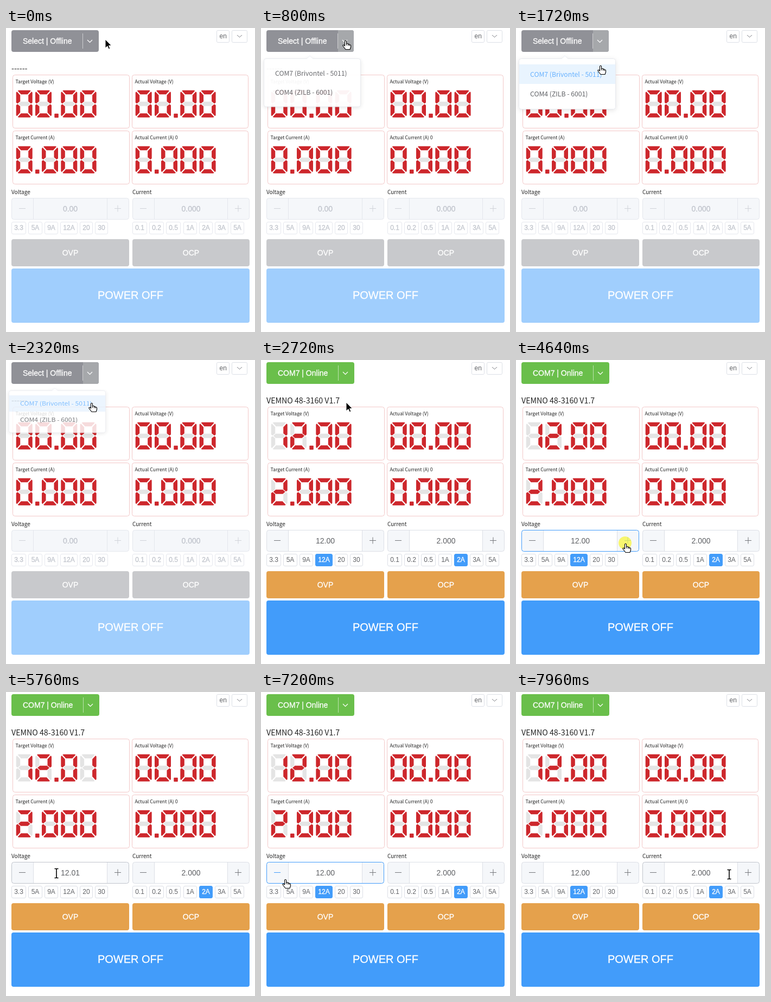
Recreate the animation shown at these times as an HTML page. Size 459x560 px, loop 8000 ms.

```html
<!DOCTYPE html>
<html lang="en">
<head>
<meta charset="utf-8">
<title>Power supply panel</title>
<style>
  html, body { margin: 0; width: 100%; height: 100%; overflow: hidden; background: #fff; }
  svg { display: block; width: 459px; height: 560px; }
  text { font: 14px "Liberation Sans", Arial, sans-serif; white-space: pre; }
  .label { font-family: "Noto Sans CJK SC", "Noto Sans CJK JP", "Noto Sans CJK", "Noto Sans", sans-serif; }
  .menu { filter: drop-shadow(0 2px 4px rgba(0, 0, 0, .1)); }
</style>
</head>
<body>
<svg id="stage" viewBox="0 0 459 560"></svg>
<script>
const stage = document.getElementById('stage');
const LOOP = 8000, STEP = 40;
const CONNECT = 2520, PLUS = 4600, MINUS = 6600;
const CLICKS = [440, 2120, PLUS, MINUS];
const BLUE = '#429cfa', DARK = '#606266', PALE = '#c0c4cc', LINE = '#dcdfe6';

// Pointer path: time, x, y
const PATH = [
  [0, 183, 21], [40, 183, 21], [160, 163, 23], [240, 155, 22],
  [1120, 155, 22], [1320, 154, 27], [1720, 155, 68], [1960, 157, 78],
  [3240, 157, 78], [3400, 158, 98], [3640, 162, 178], [3880, 161, 262], [4040, 160, 279],
  [4080, 160, 279], [4200, 168, 292], [4440, 196, 332], [4560, 201, 337],
  [5320, 201, 337], [5440, 184, 336], [5760, 93, 334], [6000, 44, 337], [6120, 35, 338],
  [6160, 35, 338], [6360, 36, 340],
  [7160, 36, 340], [7280, 60, 352], [7440, 140, 374], [7600, 240, 376],
  [7760, 335, 362], [7880, 380, 342], [7960, 393, 336], [LOOP, 393, 336]
];

const clamp = v => Math.max(0, Math.min(1, v));
const ramp = (t, start, length) => clamp((t - start) / length);
const inside = (p, x0, y0, x1, y1) => p.x >= x0 && p.x < x1 && p.y >= y0 && p.y < y1;
const mix = (a, b, k) => `color-mix(in srgb, ${b} ${k * 100}%, ${a})`;

function pointerAt(t) {
  const i = Math.max(1, PATH.findIndex(k => k[0] > t));
  const [t0, x0, y0] = PATH[i - 1], [t1, x1, y1] = PATH[i];
  const k = (t - t0) / (t1 - t0);
  return { x: x0 + (x1 - x0) * k, y: y0 + (y1 - y0) * k };
}

const rect = (x, y, w, h, fill, stroke = 'none', rx = 4) =>
  `<rect x="${x}" y="${y}" width="${w}" height="${h}" rx="${rx}" fill="${fill}" stroke="${stroke}"/>`;
const line = (d, color, width = 1, extra = '') =>
  `<path d="${d}" fill="none" stroke="${color}" stroke-width="${width}" ${extra}/>`;
const text = (s, x, y, size, fill, extra = '') =>
  `<text x="${x}" y="${y}" style="font-size:${size}px" fill="${fill}" ${extra}>${s}</text>`;
const label = (s, x, y, size, fill = '#222') => text(s, x, y, size, fill, 'class="label"');
const centered = (s, x, y, size, fill, heavy) =>
  text(s, x, y, size, fill, 'text-anchor="middle"' + (heavy ? ` stroke="${fill}" stroke-width=".3"` : ''));

// Seven segments in a 30 x 50 cell, order a b c d e f g
const BAR = [[3, 1], [4.5, 0], [25.5, 0], [27, 1], [21, 7.5], [9, 7.5]];
const SIDE = [[1.5, 2.5], [7.5, 9], [7.5, 20.5], [2.5, 24.5], [0, 22.5], [0, 4]];
const MID = [[4, 25], [8.5, 21], [21.5, 21], [26, 25], [21.5, 29], [8.5, 29]];
const flip = (pts, fx, fy) => pts.map(([x, y]) => [fx ? 30 - x : x, fy ? 50 - y : y]);
const SEGMENTS = [BAR, flip(SIDE, 1, 0), flip(SIDE, 1, 1), flip(BAR, 0, 1), flip(SIDE, 0, 1), SIDE, MID];
const LIT = { 0: 'abcdef', 1: 'bc', 2: 'abged' };

function display(value, x, y) {
  let out = '';
  for (const ch of value) {
    if (ch === '.') {
      out += rect(x, y + 43, 7.5, 7.5, '#cd272c', 'none', 1);
      x += 12;
      continue;
    }
    const draw = on => SEGMENTS.map((pts, i) => LIT[ch].includes('abcdefg'[i]) === on
      ? `<polygon points="${pts.join(' ')}" fill="${on ? '#cd272c' : '#e4e4e4'}"/>` : '').join('');
    out += `<g transform="translate(${x} ${y})">${draw(false)}${draw(true)}</g>`;
    x += 35.3;
  }
  return out;
}

function card(title, value, x, y) {
  return rect(x + .5, y + .5, x < 100 ? 215 : 214, 98, '#fff', '#f3c8c8')
    + label(title, x + 5.5, y + 16, 8.8) + display(value, x + 6.7, y + 28.7);
}

function numberInput(x, w, value, p, online) {
  const left = x + 40.5, right = x + w - 40.5;
  const over = online && inside(p, x, 313, x + w, 353);
  const onMinus = over && p.x < left, onPlus = over && p.x > right;
  const border = onMinus || onPlus ? BLUE : over ? PALE : online ? LINE : '#e4e7ed';
  const icon = on => on ? BLUE : online ? '#74767b' : '#d0d3d9';
  const cx = right + 19.5;
  return rect(x + .5, 313.5, w - 1, 39, '#f5f7fa', border)
    + (online ? rect(left, 314, right - left, 38, '#fff', 'none', 0) : '')
    + line(`M${left} 314V352M${right} 314V352`, online ? LINE : '#e4e7ed')
    + line(`M${x + 14} 332.5h12`, icon(onMinus))
    + line(`M${cx - 6} 332.5h12M${cx} 326.5v12`, icon(onPlus))
    + centered(value, x + w / 2, 338, 14, online ? DARK : PALE, !online);
}

const VOLT_TAGS = [['3.3', 10, 27], ['5A', 41, 26], ['9A', 71, 25], ['12A', 100, 32], ['20', 136, 24], ['30', 164, 24]];
const AMP_TAGS = [['0.1', 233, 27], ['0.2', 264, 27], ['0.5', 295, 27], ['1A', 327, 25],
  ['2A', 356, 25], ['3A', 385, 25], ['5A', 414, 25]];

const tags = (list, active, online) => list.map(([name, x, w]) => {
  const on = name === active;
  return rect(x + .5, 357.5, w - 1, 22, on ? BLUE : '#fff', on ? BLUE : online ? LINE : '#e6e8ee', 2.5)
    + centered(name, x + w / 2, 372, 12, on ? '#fff' : online ? DARK : PALE, on || !online);
}).join('');

function header(t, p, online) {
  const lit = inside(p, 142, 4, 172, 44) || (t > 600 && t < CONNECT);
  const w = online ? 162 : 161, split = w - 19.5;
  const base = mix('#909197', '#6abf4b', ramp(t, CONNECT, 120));
  return rect(10, 4, w, 40, base)
    + (lit && !online ? `<path d="M142 4H167a4 4 0 0 1 4 4V40a4 4 0 0 1-4 4H142z" fill="#a6a8ab"/>` : '')
    + line(`M${split} 10V38`, '#fff', 1, 'opacity=".55"')
    + text(online ? 'COM7 | Online' : 'Select | Offline', 31, 29, 14, '#fff', 'stroke="#fff" stroke-width=".3"')
    + line(`M${split + 8.5} 22l4.5 4.5l4.5-4.5`, '#fff', 1.2)
    + rect(388.5, 4.5, 23, 22, '#fff', LINE, 2) + text('en', 393.5, 19, 12, DARK)
    + rect(416.5, 4.5, 28, 22, '#fff', LINE, 2) + line('M426 13l4.5 4l4.5-4', '#7d8086');
}

function menu(t, p) {
  const shown = (1 - (1 - ramp(t, 640, 300)) ** 4) * (1 - ramp(t, 2280, 240));
  if (!shown) return '';
  const item = (s, y) => {
    const on = inside(p, 6, y, 183, y + 36);
    return (on ? rect(6, y, 177, 36, '#e9f4fe', 'none', 0) : '')
      + label(s, 26, y + 23, 12.2, on ? '#66b1ff' : DARK);
  };
  return `<g class="menu" opacity="${shown}" transform="translate(0 56) scale(1 ${shown}) translate(0 -56)">`
    + rect(5.5, 56.5, 178, 93, '#fff', '#e8eaef')
    + `<path d="M84 57l6-6l6 6" fill="#fff" stroke="#ebeef5"/>`
    + item('COM7 (Brivontel - 5011)', 67) + item('COM4 (ZILB - 6001)', 103) + '</g>';
}

function cursor(t, p, online) {
  const overField = online && inside(p, 10, 313, 449, 353);
  const typing = overField && (inside(p, 51, 313, 187, 353) || inside(p, 274, 313, 409, 353));
  const hand = (overField && !typing && !inside(p, 227, 313, 233, 353))
    || inside(p, 10, 4, 172, 44)
    || (t > 640 && t < 2400 && inside(p, 6, 67, 183, 139))
    || (online && [...VOLT_TAGS, ...AMP_TAGS].some(([, x, w]) => inside(p, x, 357, x + w, 380)));
  const place = s => `<g transform="translate(${p.x} ${p.y})" stroke-linejoin="round">${s}</g>`;
  if (typing) {
    const beam = 'M-3.5-8.5H-1Q0-8.5 0-7Q0-8.5 1-8.5H3.5M0-7V7M-3.5 8.5H-1Q0 8.5 0 7Q0 8.5 1 8.5H3.5';
    return place(line(beam, '#fff', 3) + line(beam, '#000', 1.6));
  }
  if (hand) return place(`<g transform="translate(1 1)">
    <path d="M-1.5 1.5Q0-1 1.5 1.5V6Q4.5 4.5 4.5 7Q7 6 7 8Q9.5 7.5 9.5 9.5V12Q9 14 8 16.5H0L-5 10Q-5.5 7.5-3 8.5L-1.5 10Z" fill="#fff" stroke="#000" stroke-width="1.1"/>
    ${line('M1.5 6V9M4.5 7V9.5M7 8V10', '#000')}</g>`);
  return place('<path d="M0 0V16L4 12.5L6.3 17.8L8.8 16.8L6.5 11.5H11.3Z" stroke="#fff"/>');
}

// Yellow spot: holds briefly, then grows and fades
function clickSpot(t, p) {
  const start = CLICKS.find(c => t >= c && t < c + 200);
  if (start === undefined) return '';
  const k = ramp(t, start + 80, 120);
  return `<circle cx="${p.x}" cy="${p.y}" r="${12 + 12 * k}" fill="#f8f540" opacity="${.75 * (1 - k)}"/>`;
}

function draw(t) {
  const p = pointerAt(t), online = t >= CONNECT, k = ramp(t, CONNECT, 120);
  const raised = lag => t >= PLUS + lag && t < MINUS + lag;
  const wide = (s, x, w) => rect(x, 389, w, 50, mix('#c8c9cc', '#e5a14c', k)) + centered(s, x + w / 2, 419, 14, '#fff', true);
  const volts = raised(200) ? '12.01' : '12.00';
  stage.innerHTML = header(t, p, online)
    + (online ? label('VEMNO 48-3160 V1.7', 10, 80, 14.2) : label('------', 10, 79, 14.2))
    + card('Target Voltage (V)', online ? volts : '00.00', 12, 86)
    + card('Actual Voltage (V)', '00.00', 232, 86)
    + card('Target Current (A)', online ? '2.000' : '0.000', 12, 189)
    + card('Actual Current (A) 0', '0.000', 232, 189)
    + label('Voltage', 10, 306, 10) + label('Current', 233, 306, 10)
    + numberInput(10, 217, online ? (raised(120) ? '12.01' : '12.00') : '0.00', p, online)
    + numberInput(233, 216, online ? '2.000' : '0.000', p, online)
    + tags(VOLT_TAGS, online && !raised(200) ? '12A' : '', online)
    + tags(AMP_TAGS, online ? '2A' : '', online)
    + wide('OVP', 10, 217) + wide('OCP', 233, 216)
    + rect(10, 443, 439, 100, mix('#a0cefd', BLUE, k))
    + centered('POWER OFF', 229.5, 499, 20, '#fff', true)
    + menu(t, p) + clickSpot(t, p) + cursor(t, p, online);
}

const origin = performance.now();
let last = -1;
function frame() {
  const t = Math.floor((performance.now() - origin) % LOOP / STEP) * STEP;
  if (t !== last) draw(last = t);
  requestAnimationFrame(frame);
}
frame();
</script>
</body>
</html>
```
